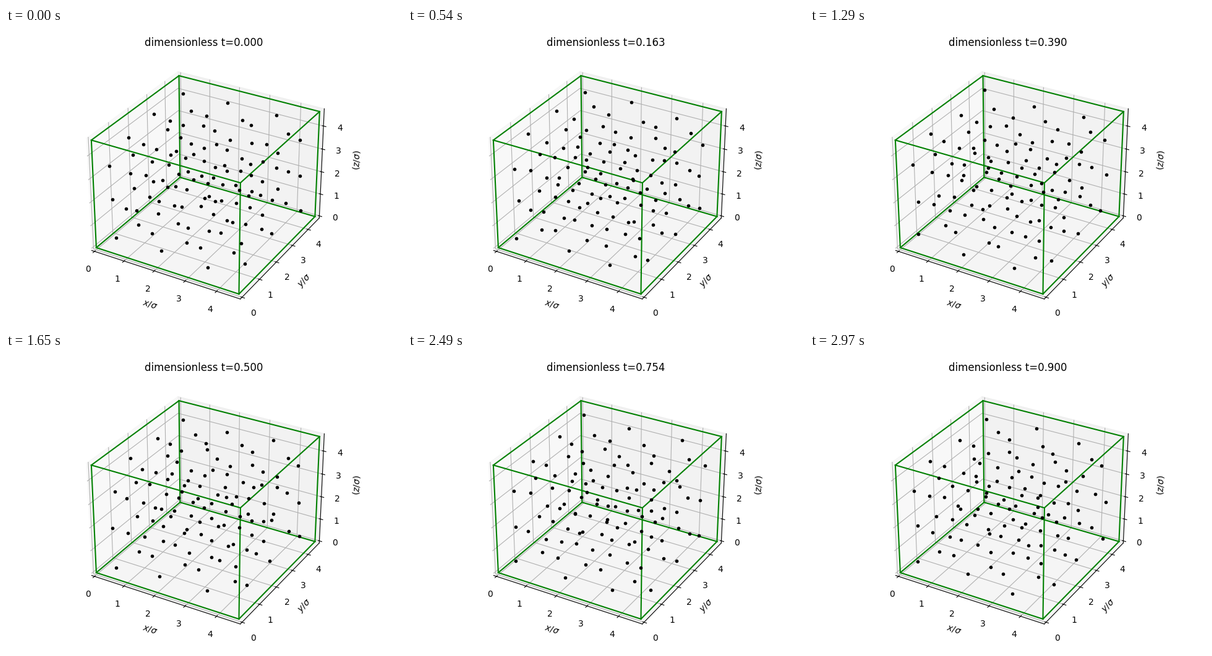
Write a matplotlib script that moves like this. It is 640 px wide and 480 px high and loops after 3000 ms.

```python
import itertools

import matplotlib.pyplot as plt
import numpy as np
from matplotlib.animation import FuncAnimation

FRAMES, INTERVAL = 100, 30
CELLS, DENSITY = 3, 1.08
DT, STEPS, WARMUP = 0.001, 900, 500
START_TEMP = 2.0

# FCC crystal in a periodic box
basis = np.array([[0, 0, 0], [0, 1, 1], [1, 0, 1], [1, 1, 0]]) / 2
cells = np.array(list(itertools.product(range(CELLS), repeat=3)))
sites = (cells[:, None] + basis + 0.25).reshape(-1, 3)
N = len(sites)
L = (N / DENSITY) ** (1 / 3)


def forces(pos):
    """Lennard-Jones forces with the minimum image convention."""
    d = pos[:, None] - pos[None]
    d -= L * np.round(d / L)
    r2 = (d ** 2).sum(axis=2) + np.eye(N)
    s6 = r2 ** -3
    return ((24 * (2 * s6 ** 2 - s6) / r2)[:, :, None] * d).sum(axis=1)


def simulate():
    """Velocity Verlet from the lattice; returns positions after warm-up."""
    rng = np.random.default_rng(7)
    pos = sites * L / CELLS
    vel = rng.normal(0, START_TEMP ** 0.5, (N, 3))
    vel -= vel.mean(axis=0)
    acc = forces(pos)
    track = []
    for step in range(WARMUP + STEPS + 1):
        if step >= WARMUP:
            track.append(pos % L)
        vel = vel + acc * DT / 2
        pos = pos + vel * DT
        acc = forces(pos)
        vel = vel + acc * DT / 2
    return track


track = simulate()

fig = plt.figure(figsize=(6.4, 4.8), dpi=100)
ax = fig.add_subplot(projection="3d")

corners = list(itertools.product((0, L), repeat=3))
for a, b in itertools.combinations(corners, 2):
    if sum(p != q for p, q in zip(a, b)) == 1:
        ax.plot(*zip(a, b), color="green", lw=1.5)
dots, = ax.plot(*track[0].T, "k.")

pad = L / 48
for set_lim in (ax.set_xlim, ax.set_ylim, ax.set_zlim):
    set_lim(-pad, L + pad)
ax.set_xlabel(r"$x/\sigma$")
ax.set_ylabel(r"$y/\sigma$")
ax.set_zlabel(r"$(z/\sigma)$")
title = ax.set_title("dimensionless t=0.000")
fig.tight_layout()


def update(i):
    step = STEPS * i // (FRAMES - 1)
    dots.set_data_3d(*track[step].T)
    title.set_text(f"dimensionless t={step * DT:.3f}")
    return dots, title


anim = FuncAnimation(fig, update, frames=FRAMES, interval=INTERVAL,
                     repeat=True, repeat_delay=0, blit=False)
plt.show()
```
